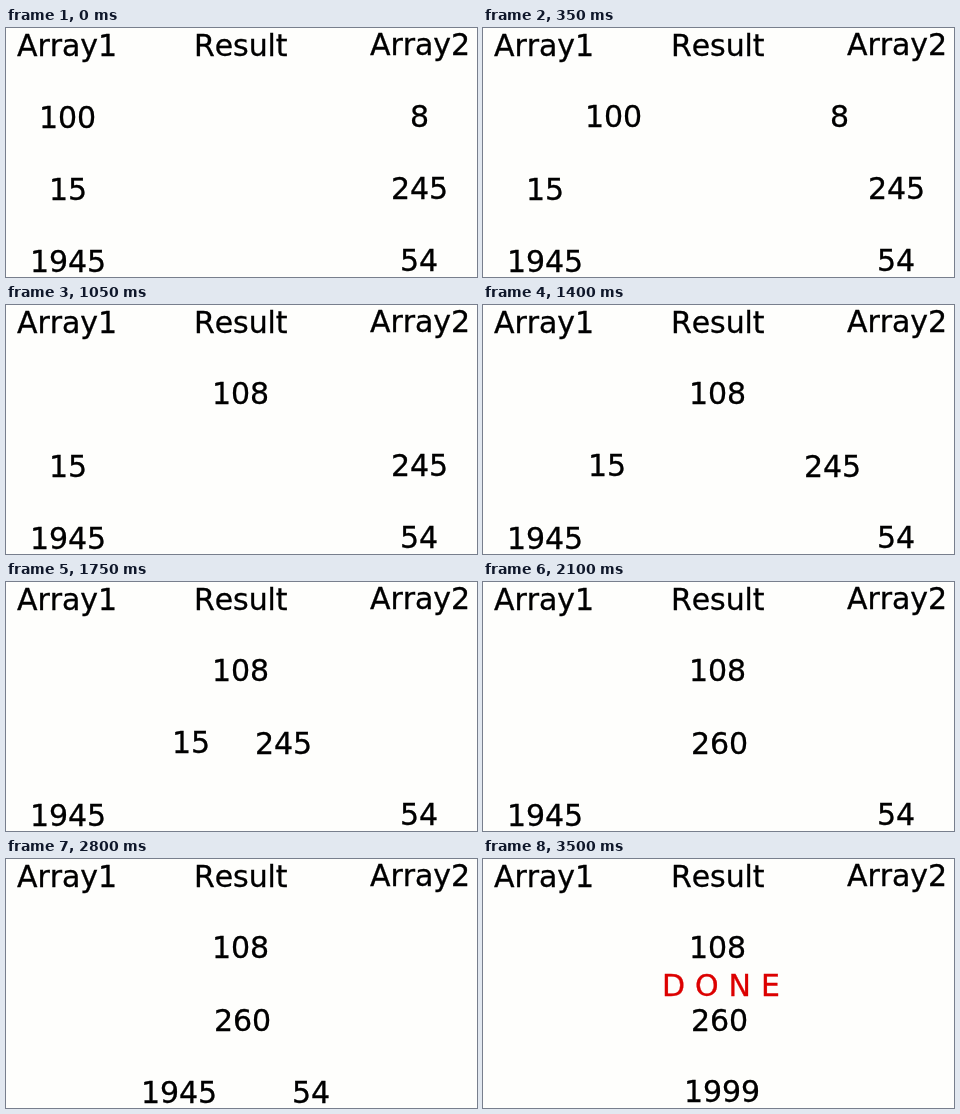
These frames come from a looping animation (471 by 249 pixels, 4.2 s). An HTML page:

```html
<!DOCTYPE html>
<html lang="en">
<head>
<meta charset="utf-8">
<title>Adding two arrays</title>
<style>
  html, body { margin: 0; width: 100%; height: 100%; overflow: hidden; background: #fefefc; }
  svg { display: block; width: 471px; height: 249px; }
  text {
    font: 30px "DejaVu Sans", sans-serif; font-kerning: none; letter-spacing: -0.09px;
    white-space: pre; fill: #000; stroke: #000; stroke-width: 0.3px;
  }
  .done { fill: #dc0000; stroke: #dc0000; letter-spacing: 0.2px; }
</style>
</head>
<body>
<svg id="stage" viewBox="0 0 471 249">
  <text x="11" y="28">Array1</text>
  <text x="188" y="28">Result</text>
  <text x="364" y="27">Array2</text>
</svg>
<script>
const STEP = 350, LOOP = 4200;
const stage = document.getElementById("stage");

// Each operand has three [x, y] stops; the sum has one.
const rows = [
  { a: "100", b: "8", sum: "108", at: [206, 99],
    aStops: [[33, 100], [102, 99], [169, 99]],
    bStops: [[404, 99], [347, 99], [275, 100]] },
  { a: "15", b: "245", sum: "260", at: [208, 172],
    aStops: [[43, 172], [105, 171], [166, 171]],
    bStops: [[385, 171], [321, 172], [249, 172]] },
  { a: "1945", b: "54", sum: "1999", at: [201, 243],
    aStops: [[24, 244], [79, 244], [135, 244]],
    bStops: [[394, 243], [350, 243], [286, 244]] }
];

function addText(value, pos, className = "") {
  const el = document.createElementNS("http://www.w3.org/2000/svg", "text");
  el.textContent = value;
  el.setAttribute("class", className);
  place(el, pos);
  stage.append(el);
  return el;
}

function place(el, [x, y]) {
  el.setAttribute("x", x);
  el.setAttribute("y", y);
}

function show(el, visible) {
  el.setAttribute("visibility", visible ? "visible" : "hidden");
}

for (const row of rows) {
  row.aText = addText(row.a, row.aStops[0]);
  row.bText = addText(row.b, row.bStops[0]);
  row.sumText = addText(row.sum, row.at);
}
const done = addText("D O N E", [179, 137], "done");

function draw(ms) {
  const step = Math.floor((ms % LOOP) / STEP);
  rows.forEach((row, i) => {
    const stop = Math.max(0, step - 3 * i);
    const added = stop >= 3;
    if (!added) {
      place(row.aText, row.aStops[stop]);
      place(row.bText, row.bStops[stop]);
    }
    show(row.aText, !added);
    show(row.bText, !added);
    show(row.sumText, added);
  });
  show(done, step >= 10);
}

const start = performance.now();
function tick() {
  draw(performance.now() - start);
  requestAnimationFrame(tick);
}
tick();
</script>
</body>
</html>
```
